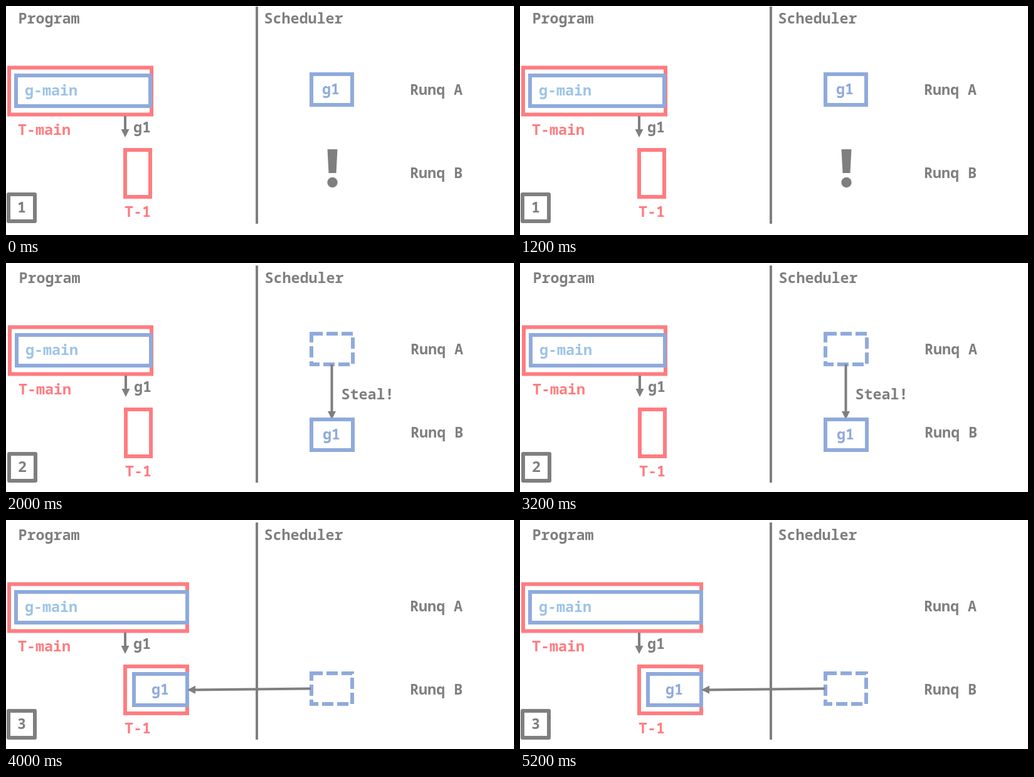
Recreate the animation shown at these times as an HTML page. Size 810 by 366 pixels, loop 6000 ms.

```html
<!DOCTYPE html>
<html lang="en">
<head>
<meta charset="utf-8">
<title>Work stealing</title>
<style>
html, body { margin: 0; width: 100%; height: 100%; overflow: hidden; background: #fff; }
svg { display: block; }
text { font: 700 23.33px "Noto Sans Mono", "DejaVu Sans Mono", monospace; white-space: pre; }
</style>
</head>
<body>
<svg id="stage" width="810" height="366" viewBox="0 0 810 366"></svg>
<script>
const GRAY = '#7f7f7f', RED = '#ff7c80', BLUE = '#8faadc', SKY = '#9dc3e6';
const STEP = 2000;
const stage = document.getElementById('stage');

const text = (s, x, y, color = GRAY) =>
  `<text x="${x}" y="${y}" fill="${color}">${s}</text>`;

const box = (x1, y1, x2, y2, color, extra = '') =>
  `<rect x="${x1}" y="${y1}" width="${x2 - x1}" height="${y2 - y1}" fill="none" stroke="${color}" stroke-width="6" ${extra}/>`;

const dashed = (...r) => box(...r, BLUE, 'stroke-dasharray="18 6"');

// Line with a solid triangular head whose tip is at (x2, y2)
function arrow(x1, y1, x2, y2) {
  const len = Math.hypot(x2 - x1, y2 - y1);
  const angle = Math.atan2(y2 - y1, x2 - x1) * 180 / Math.PI;
  return `<g transform="translate(${x1} ${y1}) rotate(${angle})" fill="${GRAY}">
    <path d="M0-2H${len - 10}V2H0z"/>
    <path d="M${len} 0l-13-6.5v13z"/></g>`;
}

// Parts present in every step; `right` is the running threads' right edge
const base = (n, right, inner) =>
  text('Program', 19.5, 28) + text('Scheduler', 411.5, 28) +
  box(5, 98.5, right, 173.5, RED) +
  box(16, 111, inner, 160, BLUE) +
  text('g-main', 30, 143, SKY) +
  text('T-main', 19, 205.5, RED) +
  arrow(190, 176, 190, 210) + text('g1', 203, 201.5) +
  box(190, 230, inner, 305, RED) +
  text('T-1', 189, 336.5, RED) +
  box(4, 301, 46, 344, GRAY, 'stroke-linejoin="round"') +
  text(n, 18, 329.5) +
  text('Runq A', 644, 141.5) + text('Runq B', 644, 274.5);

const scenes = [
  { dx: 0, dy: 0, body: base(1, 232, 230) +
      box(487, 109, 552, 158, BLUE) + text('g1', 504, 140.5, BLUE) +
      `<path d="M512.5 229h16l-2 38h-12z" fill="${GRAY}"/>
       <circle cx="520.5" cy="282" r="8.2" fill="${GRAY}"/>` },
  { dx: 1, dy: 4, body: base(2, 231, 230) +
      dashed(486, 109, 552, 158) +
      arrow(518.5, 158, 518.5, 246) + text('Steal!', 533.5, 214) +
      box(486, 246, 552, 295, BLUE) + text('g1', 504, 278, BLUE) },
  { dx: 0, dy: 4, body: base(3, 289, 289) +
      box(204, 242, 289, 292, BLUE) + text('g1', 232, 275, BLUE) +
      dashed(487, 241, 552, 290) +
      arrow(486, 265.5, 289, 267.5) }
];

stage.innerHTML = scenes.map(({ dx, dy, body }) =>
  `<g visibility="hidden"><path d="M400 ${dy ? 4 : 1}V${dy ? 351 : 348}" stroke="${GRAY}" stroke-width="4"/>
   <g transform="translate(${dx} ${dy})">${body}</g></g>`).join('');

const layers = [...stage.children];

function draw(now) {
  const step = Math.floor(now / STEP) % layers.length;
  layers.forEach((g, i) => g.setAttribute('visibility', i === step ? 'visible' : 'hidden'));
}

const start = performance.now();
function tick() {
  draw(performance.now() - start);
  requestAnimationFrame(tick);
}
tick();
</script>
</body>
</html>
```
